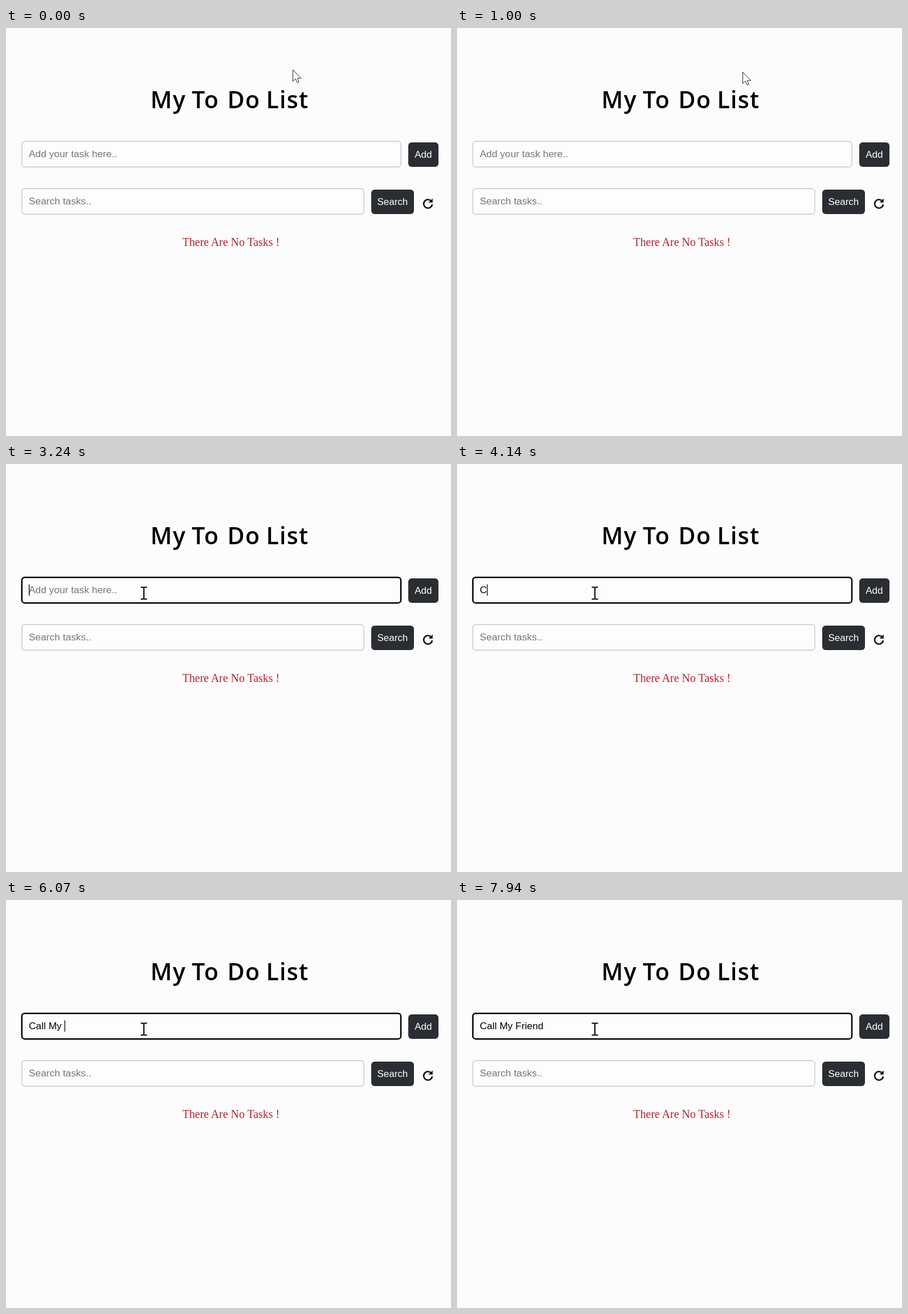
An HTML page for the animation above (8000 ms loop, 781 by 717 pixels).

```html
<!DOCTYPE html>
<html lang="en">
<head>
<meta charset="utf-8">
<title>To do list</title>
<style>
  html, body { margin: 0; width: 100%; height: 100%; overflow: hidden; background: #fcfcfc; }
  svg { display: block; width: 100%; height: 100%; }
  text { white-space: pre; }
  .title { font: 600 41px "Open Sans", "Noto Sans", sans-serif; letter-spacing: 1.3px; }
  .field { font: 17.33px "Liberation Sans", Arial, sans-serif; }
  .hint { fill: #757575; }
  .label { font: 17px "Liberation Sans", Arial, sans-serif; fill: #fff; text-anchor: middle; }
  .notice { font: 19.9px "Liberation Serif", "Times New Roman", serif; fill: #b6212b; }
  .box { fill: #fdfdfd; stroke: #c7c6d0; stroke-width: 1.4; }
  .box.focused { stroke: #000; stroke-width: 2.5; }
  .button { fill: #2a2e33; }
</style>
</head>
<body>
<svg viewBox="0 0 781 717">
  <text class="title" y="141"><tspan x="253.5">My</tspan><tspan x="326">To</tspan><tspan x="388.5">Do</tspan><tspan x="456.5">List</tspan></text>

  <rect id="taskBox" class="box" x="27.8" y="199.2" width="665.2" height="45" rx="5"/>
  <text id="taskHint" class="field hint" x="40" y="227">Add your task here..</text>
  <text id="taskText" class="field" x="40" y="227"></text>
  <rect id="caret" y="211.5" width="1.3" height="20"/>
  <rect class="button" x="706" y="201" width="53" height="43" rx="6"/>
  <text class="label" x="732.4" y="228">Add</text>

  <rect class="box" x="27.8" y="282.2" width="600.2" height="45" rx="5"/>
  <text class="field hint" x="40" y="310">Search tasks..</text>
  <rect class="button" x="641" y="284" width="75" height="43" rx="6"/>
  <text class="label" x="678.4" y="311">Search</text>
  <path d="M745.8 303.6A7.5 7.5 0 1 0 748 310" fill="none" stroke="#161616" stroke-width="2.6"/>
  <path d="M748.8 299.5V306.8H741.5Z" fill="#161616"/>

  <text class="notice" x="309.5" y="382.5">There Are No Tasks !</text>

  <path id="arrow" d="M.5 .5V20.5L5.2 16.2 8.3 23.2 11.3 22 8.3 15.2H14.8Z" fill="#fff" stroke="#222" stroke-width="1"/>
  <path id="beam" d="M-5.5 -10.5H-1.5L0 -9.5 1.5 -10.5H5.5M0 -10V10M-5.5 10.5H-1.5L0 9.5 1.5 10.5H5.5" fill="none" stroke="#000" stroke-width="2"/>
</svg>
<script>
const LOOP = 8000, BLINK = 1060, FOCUS = 1850;
const TASK = "Call My Friend";
const KEY_TIMES = [4000, 4300, 4550, 4750, 4950, 5350, 5600, 5850, 6250, 6450, 6600, 6800, 7000, 7200];
// Pointer stops: time, x, y
const STOPS = [[0, 503, 73], [700, 503, 73], [960, 501, 77], [1400, 501, 77], [1760, 242, 227], [LOOP, 242, 227]];

const [taskBox, taskHint, taskText, caret, arrow, beam] =
  ["taskBox", "taskHint", "taskText", "caret", "arrow", "beam"].map(id => document.getElementById(id));
const show = (el, on) => el.setAttribute("visibility", on ? "visible" : "hidden");
const ease = p => p * p * (3 - 2 * p);

function pointerAt(t) {
  const next = STOPS.findIndex(stop => stop[0] > t);
  const [t0, x0, y0] = STOPS[next - 1], [t1, x1, y1] = STOPS[next];
  const p = ease((t - t0) / (t1 - t0));
  return [x0 + (x1 - x0) * p, y0 + (y1 - y0) * p];
}

function draw(t) {
  const [x, y] = pointerAt(t);
  const overField = y > 198;
  for (const el of [arrow, beam]) el.setAttribute("transform", `translate(${x} ${y})`);
  show(arrow, !overField);
  show(beam, overField);

  const typed = KEY_TIMES.filter(k => k <= t).length;
  taskText.textContent = TASK.slice(0, typed);
  show(taskHint, typed === 0);
  taskBox.classList.toggle("focused", t >= FOCUS);

  // Every key press restarts the caret's blink
  const since = t - (typed ? KEY_TIMES[typed - 1] : FOCUS);
  caret.setAttribute("x", 40 + (typed ? taskText.getComputedTextLength() : 0));
  show(caret, since >= 0 && since % BLINK < BLINK / 2);
}

const start = performance.now();
function tick() {
  draw((performance.now() - start) % LOOP);
  requestAnimationFrame(tick);
}
tick();
</script>
</body>
</html>
```
